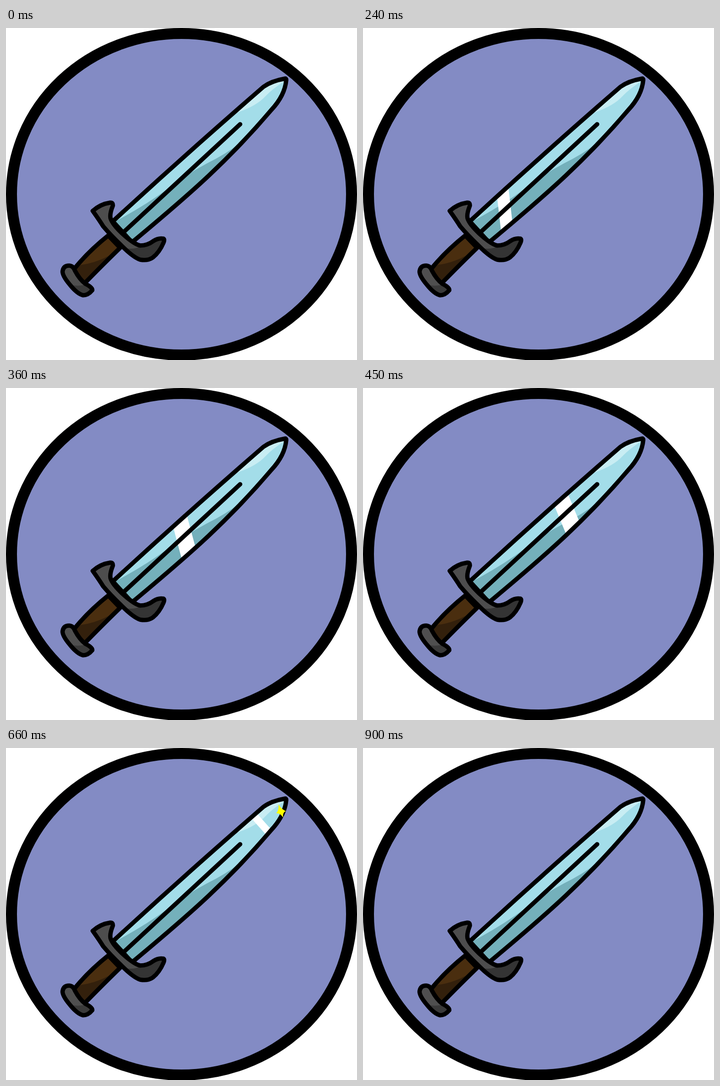
Write an HTML page that moves like this. It is 769 px wide and 728 px high and loops after 0.93 s.

```html
<!DOCTYPE html>
<html lang="en">
<head>
<meta charset="utf-8">
<title>Shining sword</title>
<style>
  html, body { margin: 0; width: 100%; height: 100%; overflow: hidden; background: #fff; }
  svg { display: block; width: 100%; height: 100%; }
  .line { fill: none; stroke: #000; stroke-width: 9.5; stroke-linejoin: round; stroke-linecap: round; }
</style>
</head>
<body>
<svg viewBox="0 0 769 728" preserveAspectRatio="none">
  <defs>
    <path id="blade" d="M234 424Q398 273 564 129Q582 116 611 111Q614 110 614 114Q611 148 581 180Q520 252 446 322Q390 375 276 470Z"/>
    <path id="grip" d="M224 455Q180 490 148 530L170 562Q212 519 250 482Z"/>
    <path id="guard" d="M190 401Q207 386 228 383Q235 382 234 390Q227 407 229 417Q233 430 254 450Q280 474 294 477Q310 477 323 467Q334 460 345 462Q348 464 345 471Q336 492 322 503Q311 511 294 508Q279 503 254 478Q230 455 213 435Q205 422 190 401Z"/>
    <path id="pommel" d="M124 533Q126 521 138 521Q147 521 151 532Q161 551 174 561Q190 569 189 575Q180 586 169 586Q156 583 140 563Q123 543 124 533Z"/>
    <clipPath id="inBlade"><use href="#blade"/></clipPath>
    <clipPath id="inGrip"><use href="#grip"/></clipPath>
    <clipPath id="inGuard"><use href="#guard"/></clipPath>
    <clipPath id="inPommel"><use href="#pommel"/></clipPath>
  </defs>

  <ellipse cx="384.5" cy="364.5" rx="372.5" ry="352.5" fill="#838bc4" stroke="#000" stroke-width="24"/>

  <g clip-path="url(#inBlade)">
    <use href="#blade" fill="#a3dde9"/>
    <path fill="#c8edf3" d="M505 186Q549 171 568 150Q583 134 608 118L614 104L560 120Z"/>
    <path fill="#74b0bb" d="M230 429Q303 391 355 352Q390 324 440 297Q493 271 524 242V480H230Z"/>
    <polygon id="gleam" fill="#fff" transform="rotate(-41.8)"/>
  </g>
  <use href="#blade" class="line"/>
  <path class="line" d="M256 449L513 211"/>

  <g clip-path="url(#inGrip)">
    <use href="#grip" fill="#4a2e0f"/>
    <path fill="#33200c" d="M145 521Q200 520 250 484V570H145Z"/>
  </g>
  <use href="#grip" class="line"/>

  <g clip-path="url(#inGuard)">
    <use href="#guard" fill="#4d4d4d"/>
    <path fill="#343434" d="M256 482Q282 488 300 476L325 455H360V520H250Z"/>
  </g>
  <use href="#guard" class="line"/>

  <g clip-path="url(#inPommel)">
    <use href="#pommel" fill="#4f4f4f"/>
    <path fill="#3a3a3a" d="M140 563Q166 568 178 560H200V595H140Z"/>
  </g>
  <use href="#pommel" class="line"/>

  <path id="star" fill="#ff0" d="M0-29Q5-6 20 8Q6 7 0 29Q-5 8-21 3Q-6-5 0-29Z"/>
</svg>

<script>
  const LOOP = 930, TICK = 30;
  const gleam = document.getElementById('gleam');
  const star = document.getElementById('star');

  // A leaning band in blade coordinates: x runs from hilt to tip, y across.
  function drawGleam(t) {
    const u = Math.max((t - 240) / 420, -0.2); // waits at the hilt, then sets off
    const bump = Math.sin(Math.PI * u);
    const mid = -34 + 340 * u + 13 * bump;
    const lean = 24 * (1 - u);
    const half = Math.max(0, 16 + 17 * (1 - u) + 15 * bump) / 2;
    const top = mid + lean, low = mid - lean;
    gleam.setAttribute('points',
      `${top - half},470 ${top + half},470 ${low + half},538 ${low - half},538`);
    gleam.setAttribute('visibility', t < 90 ? 'hidden' : 'visible');
  }

  // Grows to full size at half time, then shrinks away, rocking once.
  function drawStar(t) {
    const v = (t - 600) / 300;
    const size = v < 0 ? 0 : Math.max(0, Math.min(0.2 + 1.6 * v, 2 - 2 * v));
    const angle = -20 * Math.sin(2 * Math.PI * v);
    star.setAttribute('transform', `translate(602 138) rotate(${angle}) scale(${size})`);
  }

  function frame() {
    const t = Math.floor((performance.now() % LOOP) / TICK) * TICK;
    drawGleam(t);
    drawStar(t);
    requestAnimationFrame(frame);
  }
  frame();
</script>
</body>
</html>
```
